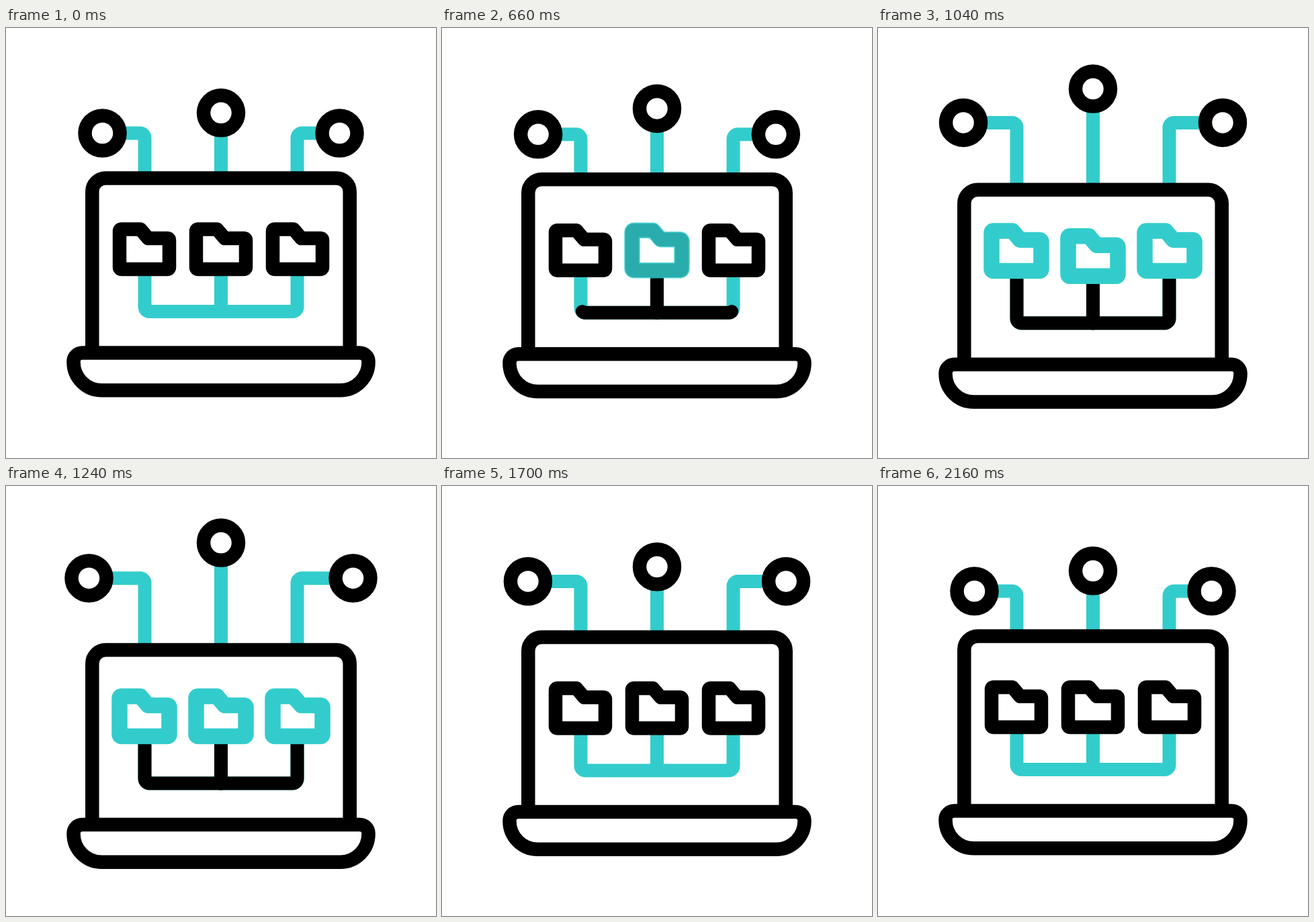
Write an HTML page with a canvas that moves like this. It is 640 by 640 pixels and loops after 2.48 s.

```html
<!DOCTYPE html>
<html lang="en">
<head>
<meta charset="utf-8">
<title>Laptop network</title>
<style>
  html, body { margin: 0; width: 100%; height: 100%; overflow: hidden; background: #fff; }
  canvas { display: block; width: 640px; height: 640px; }
</style>
</head>
<body>
<canvas id="stage" width="640" height="640"></canvas>
<script>
const ctx = document.getElementById('stage').getContext('2d');
const LOOP = 2480, STEP = 20;
const BLACK = '#000', TEAL = '#33cccc', LINE = 20.5;
const MID = 320, SPREAD = 113.5;

// Cubic bezier easing, solved by bisection
function bezier(x1, y1, x2, y2) {
  const at = (a, b, s) => 3 * a * s * (1 - s) ** 2 + 3 * b * s * s * (1 - s) + s ** 3;
  return u => {
    let lo = 0, hi = 1;
    for (let i = 0; i < 24; i++) {
      const s = (lo + hi) / 2;
      if (at(x1, x2, s) < u) lo = s; else hi = s;
    }
    return at(y1, y2, lo);
  };
}
const ease = bezier(.25, .1, .25, 1);
const glide = bezier(.2, .1, .25, 1);
const inOut = bezier(.42, 0, .58, 1);

const ramp = (t, a, b) => Math.min(1, Math.max(0, (t - a) / (b - a)));

// keys: [time, value, easing towards this key]
function track(t, keys) {
  let [t0, v0] = keys[0];
  if (t <= t0) return v0;
  for (const [t1, v1, fn] of keys.slice(1)) {
    if (t < t1) return v0 + (v1 - v0) * fn(ramp(t, t0, t1));
    t0 = t1;
    v0 = v1;
  }
  return v0;
}

// Squash, long stretch, squash, rest
const spring = (t, squash, stretch) => track(t, [
  [220, 0], [365, squash, ease], [1530, stretch, glide],
  [1853, squash, inOut], [2090, 0, ease]
]);

function folderState(t, side) {
  const lagIn = side ? 165 : 0, lagOut = side ? 80 : 0;
  const rise = track(t - lagIn, [[660, 0], [860, -15, inOut], [1030, -7, inOut]]);
  const back = 1 - inOut(ramp(t - lagOut, 1360, 1520));
  const lit = side
    ? ramp(t, 745, 840) * (1 - ramp(t, 1410, 1510))
    : ramp(t, 580, 675) * (1 - ramp(t, 1340, 1444));
  return { lift: rise * back, lit };
}

function stroke(color, width = LINE) {
  ctx.strokeStyle = color;
  ctx.lineWidth = width;
  ctx.stroke();
}

function ring(x, y) {
  ctx.beginPath();
  ctx.arc(x, y, 26, 0, Math.PI * 2);
  ctx.fillStyle = '#fff';
  ctx.fill();
  stroke(BLACK);
}

function folder(x, y, lit) {
  const p = new Path2D('M-34-29.5H-6L5.5-16H34Q37-16 37-13V27Q37 30 34 30H-34Q-37 30-37 27V-26.5Q-37-29.5-34-29.5Z');
  ctx.save();
  ctx.translate(x, y);
  ctx.lineJoin = 'round';
  ctx.lineWidth = LINE;
  ctx.strokeStyle = BLACK;
  ctx.stroke(p);
  if (lit > 0) {
    ctx.globalAlpha = lit;
    ctx.lineWidth = 23.5;
    ctx.strokeStyle = TEAL;
    ctx.stroke(p);
  }
  ctx.restore();
}

// Branch from the middle of the bus up to a folder; dir is -1, 0 or 1
function branch(dir, y, top) {
  const x = MID + dir * SPREAD;
  ctx.beginPath();
  ctx.moveTo(MID, y);
  if (dir) ctx.arcTo(x, y, x, top, 7);
  ctx.lineTo(x, top);
  return (y - top) + (dir ? SPREAD - 3 : 0);
}

function current(dir, y, top, t) {
  const time = dir ? 280 : 200;
  const from = ramp(t, 1300, 1300 + time), to = ramp(t, 480, 480 + time);
  if (to <= from) return;
  const len = branch(dir, y, top);
  ctx.save();
  ctx.lineCap = 'round';
  ctx.setLineDash([len * (to - from), 1000]);
  ctx.lineDashOffset = -len * from;
  stroke(BLACK, 20);
  ctx.restore();
}

function laptop(dy) {
  ctx.save();
  ctx.translate(0, dy);
  ctx.beginPath();
  ctx.moveTo(128.3, 483);
  ctx.arcTo(128.3, 223.5, 320, 223.5, 20);
  ctx.arcTo(511.7, 223.5, 511.7, 483, 20);
  ctx.lineTo(511.7, 483);
  stroke(BLACK);
  ctx.beginPath();
  ctx.moveTo(320, 483.5);
  ctx.arcTo(539.5, 483.5, 539.5, 497, 13);
  ctx.arcTo(539.5, 539.3, 320, 539.3, 42);
  ctx.arcTo(100.5, 539.3, 100.5, 497, 42);
  ctx.arcTo(100.5, 483.5, 320, 483.5, 13);
  ctx.closePath();
  stroke(BLACK);
  ctx.restore();
}

function draw(t) {
  ctx.fillStyle = '#fff';
  ctx.fillRect(0, 0, 640, 640);

  const dy = spring(t, -15.5, 22);
  const midY = 126.3 + spring(t, 26, -44.5);
  const sideX = 176.5 - spring(t - 70, 10.3, -22);
  const sideY = 156.5 + spring(t - 70, 13.3, -21.5);
  const lid = 223.5 + dy, bus = 422 + dy;

  ctx.beginPath();
  ctx.moveTo(MID, lid);
  ctx.lineTo(MID, midY);
  for (const d of [-1, 1]) {
    const x = MID + d * SPREAD;
    ctx.moveTo(x, lid);
    ctx.arcTo(x, sideY, MID + d * sideX, sideY, 7);
    ctx.lineTo(MID + d * sideX, sideY);
  }
  stroke(TEAL, 20);

  laptop(dy);
  ring(MID, midY);
  for (const d of [-1, 1]) ring(MID + d * sideX, sideY);

  const parts = [-1, 1, 0].map(dir => {
    const { lift, lit } = folderState(t, dir !== 0);
    const y = 329 + dy + lift;
    return { dir, y, lit, top: y + 30 };
  });
  for (const p of parts) {
    branch(p.dir, bus, p.top);
    stroke(TEAL, 20);
  }
  for (const p of parts) current(p.dir, bus, p.top, t);
  for (const p of parts) folder(MID + p.dir * 114, p.y, p.lit);
}

const start = performance.now();
function frame() {
  const t = (performance.now() - start) % LOOP;
  draw(Math.floor(t / STEP) * STEP);
  requestAnimationFrame(frame);
}
frame();
</script>
</body>
</html>
```
